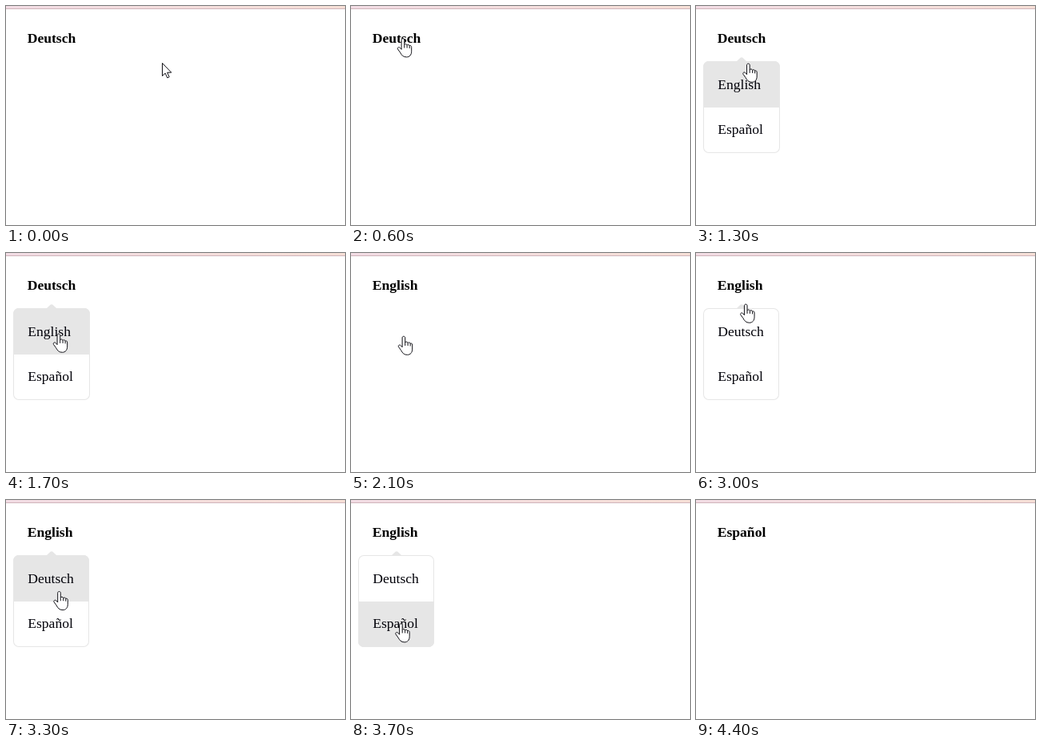
An HTML page for the animation above (4.7 s loop, 424 by 274 pixels).

```html
<!DOCTYPE html>
<html lang="en">
<head>
<meta charset="utf-8">
<title>Language menu</title>
<style>
  html, body { margin: 0; width: 100%; height: 100%; overflow: hidden; background: #fff; }
  svg { display: block; width: 100vw; height: 100vh; }
  text { font: 17.6px "Liberation Serif", "Times New Roman", serif; fill: #000008; }
  #title { font-weight: bold; fill: #000; }
  #cursor path { fill: #fff; stroke: #101016; stroke-linejoin: round; }
</style>
</head>
<body>
<svg viewBox="0 0 424 274">
  <defs>
    <linearGradient id="bar">
      <stop offset="0" stop-color="#f2dce4"/>
      <stop offset="1" stop-color="#f6dfd6"/>
    </linearGradient>
    <clipPath id="round"><rect class="box" x="9" y="69" height="115" rx="7"/></clipPath>
  </defs>
  <rect width="424" height="274" fill="#fff"/>
  <rect width="424" height="3" fill="url(#bar)"/>
  <rect y="3" width="424" height="1" fill="#d0b4bb"/>
  <text id="title" x="26.7" y="46"></text>
  <g id="menu">
    <path d="M50.5 69.5 L55.5 64.8 Q57 63.6 58.5 64.8 L63.5 69.5Z" fill="#e6e6e6"/>
    <g clip-path="url(#round)">
      <rect class="box" x="9" y="69" height="115" rx="7" fill="#fff" stroke="#e6e6e6" stroke-width="2"/>
      <rect id="hover" x="9" width="96" height="58" fill="#e6e6e6"/>
    </g>
    <text id="first" x="27.2" y="104"></text>
    <text x="27.2" y="160">Español</text>
  </g>
  <g id="cursor">
    <path id="arrow" d="M.5 .5 V16.5 L4.2 13.1 L6.8 18.9 L9.2 17.8 L6.7 12.2 H11.8Z"/>
    <path id="hand" d="M-1.9 2 C-1.9 -.3 1.7 -.3 1.7 2 V8
      C2 6.6 4.9 6.7 5.1 8.6 C5.5 7.4 8 7.6 8.2 9.5 C8.6 8.4 10.7 8.9 10.7 11
      V16 C10.7 21 8 23.4 4.4 23.4 C0 23.4 -1.6 21 -3.5 17.6
      L-6.5 13.5 C-7.5 11.5 -5 10.2 -3.6 11.8 L-1.9 13.8Z
      M1.7 8 V12 M5.1 8.6 V12 M8.2 9.5 V12.5"/>
  </g>
</svg>
<script>
const LOOP = 4700, STEP = 100;
const PICK_ENGLISH = 1900, PICK_SPANISH = 4200;
const $ = id => document.getElementById(id);
const show = (id, on) => $(id).setAttribute('visibility', on ? 'visible' : 'hidden');
const within = (t, from, to) => t >= from && t < to;

// Each move slows down towards its goal; bow bends it sideways
const home = { x: 195, y: 71 };
const moves = [
  { from: 0, to: 600, x: 65, y: 40.5 },
  { from: 1000, to: 1800, x: 66, y: 104 },
  { from: 2200, to: 2800, x: 60, y: 44.5 },
  { from: 2900, to: 3700, x: 62.5, y: 154.5, bow: 5 },
  { from: PICK_SPANISH, to: 4400, x: 230, y: 165 }
];

function pointer(t) {
  let { x, y } = home;
  for (const m of moves) {
    const k = Math.min(1, Math.max(0, (t - m.from) / (m.to - m.from)));
    const e = 1 - (1 - k) ** 1.45;
    x += (m.x - x) * e + (m.bow || 0) * Math.sin(Math.PI * k);
    y += (m.y - y) * e;
  }
  return { x, y };
}

function draw(ms) {
  const t = Math.floor((ms % LOOP) / STEP) * STEP;
  const { x, y } = pointer(t);
  const german = t < PICK_ENGLISH;

  $('title').textContent = german ? 'Deutsch' : t < PICK_SPANISH ? 'English' : 'Español';
  $('first').textContent = german ? 'English' : 'Deutsch';

  const open = within(t, 1000, PICK_ENGLISH) || within(t, 2900, PICK_SPANISH);
  for (const box of document.querySelectorAll('.box')) box.setAttribute('width', german ? 96 : 95);
  $('hover').setAttribute('y', y < 127 ? 69 : 127);
  show('menu', open);
  show('hover', open && y >= 69);

  const arrow = x > 88, visible = t < 4400;
  show('arrow', visible && arrow);
  show('hand', visible && !arrow);
  $('cursor').setAttribute('transform', `translate(${x.toFixed(2)} ${y.toFixed(2)})`);
}

const start = performance.now();
function tick() {
  draw(performance.now() - start);
  requestAnimationFrame(tick);
}
tick();
</script>
</body>
</html>
```
